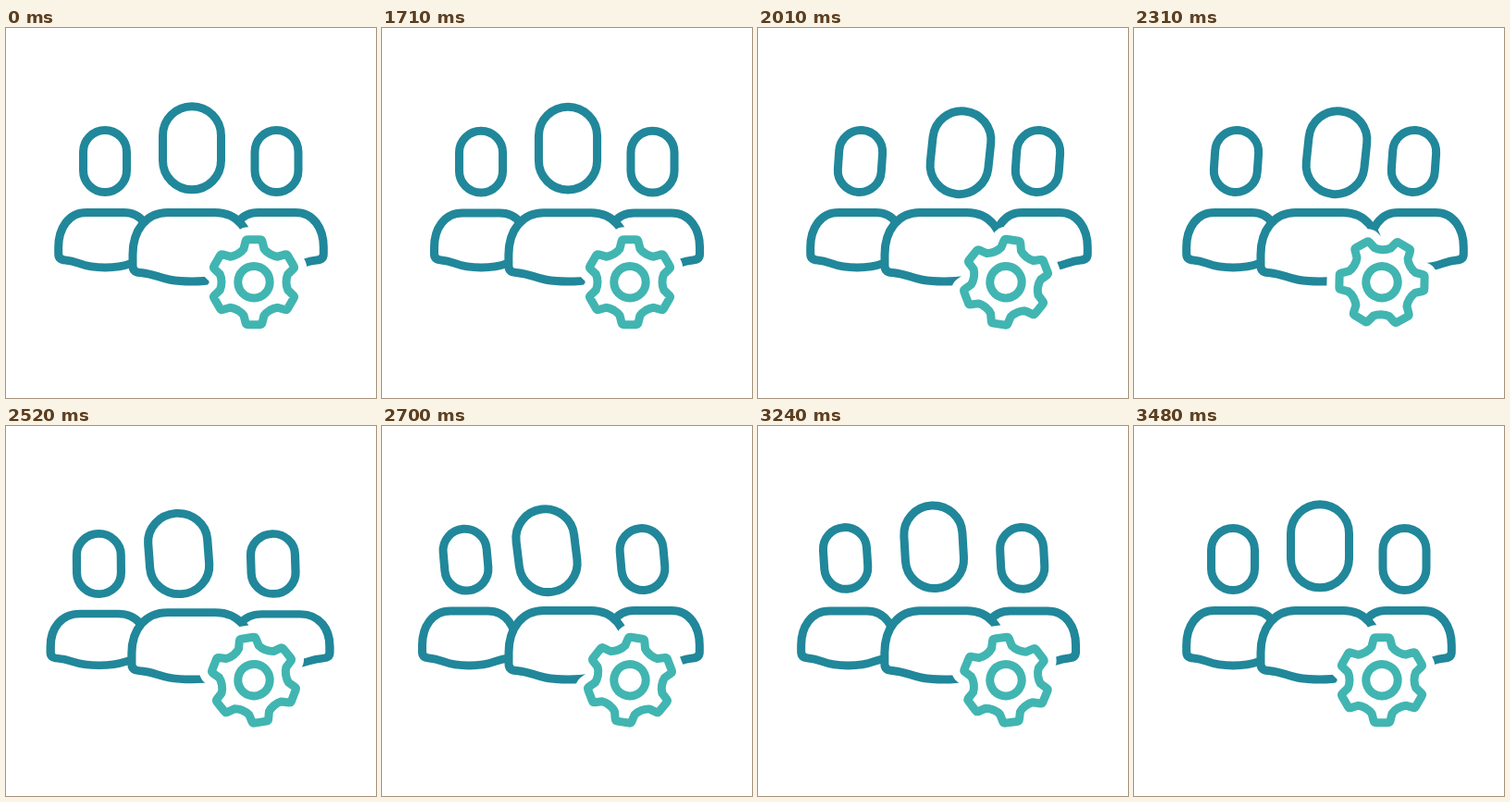
Write an HTML page that moves like this. It is 400 px wide and 400 px high and loops after 3510 ms.

```html
<!DOCTYPE html>
<html lang="en">
<head>
<meta charset="utf-8">
<title>Team settings</title>
<style>
  html, body { margin: 0; width: 100%; height: 100%; overflow: hidden; background: #fff; }
  svg { display: block; width: 100vw; height: 100vh; }
</style>
</head>
<body>
<svg viewBox="0 0 400 400" fill="#fff" stroke="#21879a" stroke-width="9" stroke-linejoin="round">
  <defs>
    <path id="shoulders" d="M-20 199.5H20C40 199.5 50.5 217 50.5 237V244Q50.5 250.5 43 251C27 252 27 259 0 259C-27 259 -27 252 -43 251Q-50.5 250.5 -50.5 244V237C-50.5 217 -40 199.5 -20 199.5Z"/>
    <rect id="face" x="-23.5" y="-33.5" width="47" height="67" rx="23.5"/>
  </defs>
  <use id="leftBody" href="#shoulders"/>
  <use id="rightBody" href="#shoulders"/>
  <path id="midBody" d="M-26 199.5H25C49 199.5 64 218 64 245V257Q64 264 57 264.5C35 266 35 274 0 274C-35 274 -35 266 -56 264.5Q-64 264 -64 257V245C-64 218 -49 199.5 -26 199.5Z"/>
  <use id="leftHead" href="#face"/>
  <use id="rightHead" href="#face"/>
  <rect id="midHead" x="-31.5" y="-45" width="63" height="90" rx="31.5"/>
  <g id="gear" stroke="#41b5b1">
    <path id="halo" stroke="#fff" stroke-width="27"/>
    <path id="rim"/>
    <circle r="17.2"/>
  </g>
</svg>
<script>
const LOOP = 3510, START = 1710;
const $ = id => document.getElementById(id);
const clamp = v => Math.min(1, Math.max(0, v));
const ease = v => { v = clamp(v); return v * v * (3 - 2 * v); };
const mix = (a, b, k) => a + (b - a) * k;
const bump = (t, start, length) => Math.sin(Math.PI * clamp((t - start) / length)) ** 2;

// Six teeth, each a tapered block standing on the rim.
function gearPath() {
  const at = (x, y, deg) => {
    const a = deg * Math.PI / 180, c = Math.cos(a), s = Math.sin(a);
    return `${(x * c - y * s).toFixed(2)} ${(x * s + y * c).toFixed(2)}`;
  };
  let d = "";
  for (let a = 0; a < 360; a += 60) {
    d += `${a ? "L" : "M"}${at(-11, -36, a)}L${at(-9, -44, a)}Q${at(-8.5, -46, a)} ${at(-6.5, -46, a)}`
      + `L${at(6.5, -46, a)}Q${at(8.5, -46, a)} ${at(9, -44, a)}L${at(11, -36, a)}`
      + `Q${at(13, -33, a)} ${at(17.5, -30.3, a)}`
      + `Q${at(22, -27.8, a)} ${at(-11, -36, a + 60)}`;
  }
  return d + "Z";
}
$("halo").setAttribute("d", gearPath());
$("rim").setAttribute("d", gearPath());

// Poses are [dx, dy, tilt] for leaning right and leaning left.
const people = [
  { name: "left", x: 107, y: 144, floor: 255, lag: 60, right: [3.5, 0, 4], left: [-16.5, 0, -5], body: [0, -13], dip: 5.5, squash: 0.07 },
  { name: "right", x: 292.5, y: 144, floor: 255, lag: 30, right: [10, 0, 4], left: [-11, 0, -5], body: [13, 0], dip: 5, squash: 0.07 },
  { name: "mid", x: 201, y: 129.7, floor: 270, lag: 0, right: [18, 5, 6], left: [-23, 5, -7], body: [0, 0], dip: 3.5, squash: 0.03 }
];

function drawPerson(p, t) {
  const toRight = ease((t - START - p.lag / 2) / 260);
  const toLeft = ease((t - 2310 - p.lag) / 300);
  const home = ease((t - 3080 - p.lag) / 310);
  const blend = (r, l) => mix(mix(r * toRight, l, toLeft), 0, home);
  const [dx, dy, tilt] = p.right.map((r, i) => blend(r, p.left[i]));
  const press = bump(t, START - 30, 290) + bump(t, 2310 + p.lag, 370) + bump(t, 3020, 250);
  const lift = 4 * bump(t, 3170, 310);
  const bodyX = p.name === "mid" ? 201 : p.x + (p.name === "left" ? 0.2 : 0.3);
  $(p.name + "Head").setAttribute("transform",
    `translate(${p.x + dx} ${p.y + dy + p.dip * press - lift}) rotate(${tilt}) scale(${1 + 0.02 * press} ${1 - 0.03 * press})`);
  $(p.name + "Body").setAttribute("transform",
    `translate(${bodyX + blend(...p.body)} ${p.floor}) scale(${1 + p.squash * 0.6 * press} ${1 - p.squash * press}) translate(0 ${-p.floor})`);
}

function draw(t) {
  people.forEach(p => drawPerson(p, t));
  const turn = 120 * ease((t - START) / (LOOP - START));
  $("gear").setAttribute("transform", `translate(268 274.7) rotate(${turn})`);
}

const begin = performance.now();
function tick() {
  draw((performance.now() - begin) % LOOP);
  requestAnimationFrame(tick);
}
draw(0);
tick();
</script>
</body>
</html>
```
